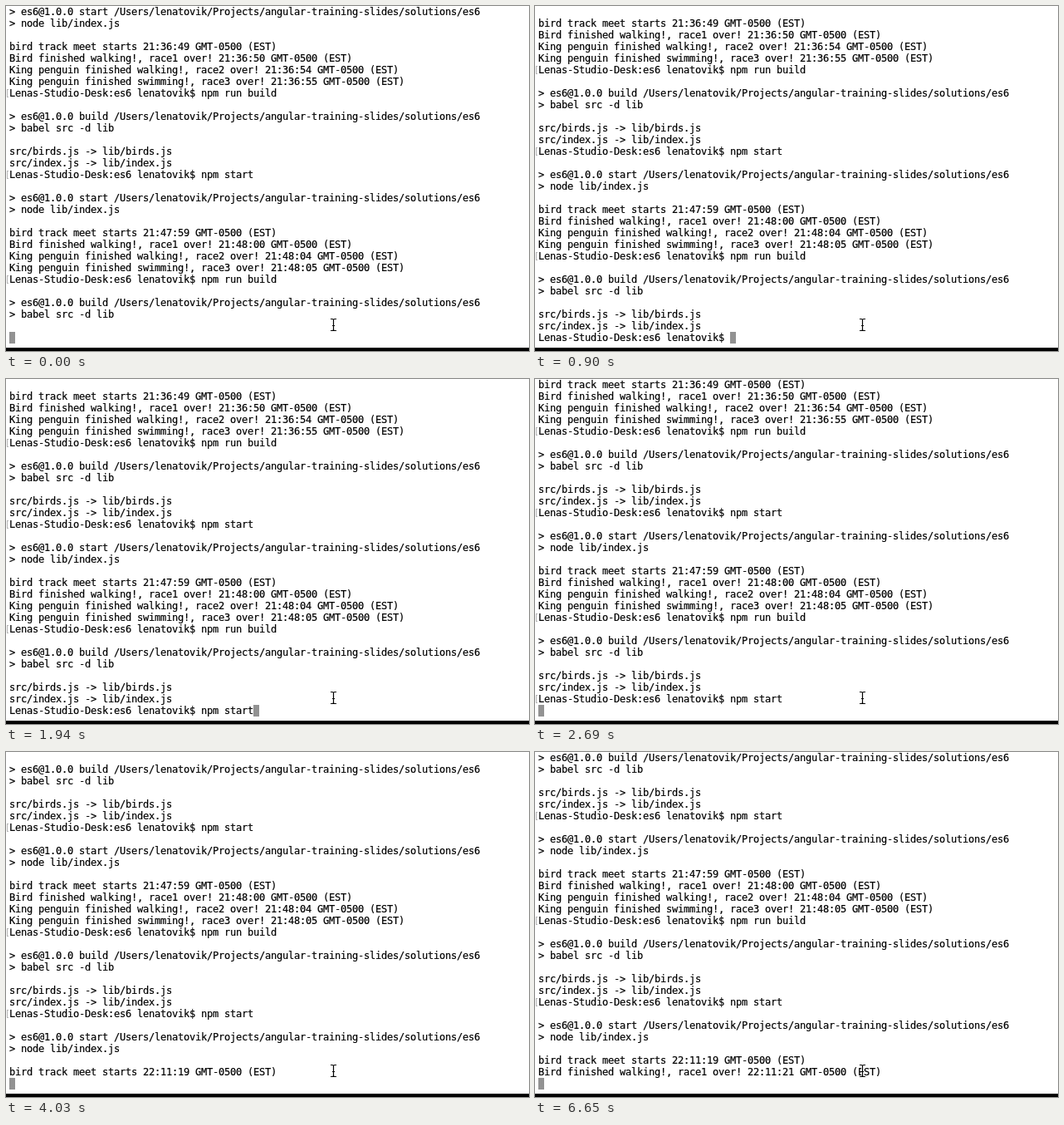
Animation of 630 by 415 pixels, one loop 8000 ms. Source, as an HTML page:

```html
<!DOCTYPE html>
<html lang="en">
<head>
<meta charset="utf-8">
<title>Terminal session</title>
<style>
  html, body { margin: 0; width: 100%; height: 100%; overflow: hidden; background: #fff; }

  .stage {
    position: relative; width: 630px; height: 415px; overflow: hidden;
    background: #fff; border-bottom: 4px solid #000; box-sizing: border-box;
    color: #000;
    font: 12px/14px "DejaVu Sans Mono", monospace;
    letter-spacing: calc(7px - 1ch);
    -webkit-text-stroke: .2px #000;
    white-space: pre;
  }
  .view { position: absolute; inset: 0 0 auto; height: 392px; overflow: hidden; }
  .view pre { margin: 0 0 0 4px; font: inherit; }
  .live { position: absolute; left: 4px; top: 392px; height: 14px; }
  .live span { position: absolute; left: 0; top: 0; }
  .live .command { left: 231px; }
  .caret { width: 7px; height: 14px; background: #929292; }

  /* prompt mark in the left margin */
  b { font-weight: inherit; position: relative; }
  b::before {
    content: ""; position: absolute; left: -3px; top: 2px;
    width: 1px; height: 8px; border: solid #b4b4b4; border-width: 1px 0 1px 1px;
  }
  .pointer { position: absolute; left: 389px; top: 374px; }

  pre, .live span { animation: 8s step-end infinite; }
  pre { animation-name: scroll; }
  .live .prompt { animation-name: prompt; }
  .live .build { animation-name: build; }
  .live .start { animation-name: start; }
  .live .caret { animation-name: caret; }

  @keyframes scroll {
    0% { transform: none; }
    5.625% { transform: translateY(-28px); }
    33.625% { transform: translateY(-42px); }
    39.125% { transform: translateY(-112px); }
    57.875%, 100% { transform: translateY(-126px); }
  }
  @keyframes prompt {
    0%, 33.625%, 100% { visibility: hidden; }
    5.625% { visibility: visible; }
  }
  @keyframes build {
    0%, 24.25%, 100% { visibility: hidden; }
    15% { visibility: visible; }
  }
  @keyframes start {
    0%, 33.625%, 100% { visibility: hidden; }
    24.25% { visibility: visible; }
  }
  @keyframes caret {
    0%, 33.625%, 100% { transform: none; }
    5.625% { transform: translateX(231px); }
    15% { transform: translateX(322px); }
    24.25% { transform: translateX(294px); }
  }
</style>
</head>
<body>
<div class="stage"><div class="view"><pre>&gt; es6@1.0.0 start /Users/lenatovik/Projects/angular-training-slides/solutions/es6
&gt; node lib/index.js

bird track meet starts 21:36:49 GMT-0500 (EST)
Bird finished walking!, race1 over! 21:36:50 GMT-0500 (EST)
King penguin finished walking!, race2 over! 21:36:54 GMT-0500 (EST)
King penguin finished swimming!, race3 over! 21:36:55 GMT-0500 (EST)
<b>Lenas-Studio-Desk:es6 lenatovik$ npm run build</b>

&gt; es6@1.0.0 build /Users/lenatovik/Projects/angular-training-slides/solutions/es6
&gt; babel src -d lib

src/birds.js -&gt; lib/birds.js
src/index.js -&gt; lib/index.js
<b>Lenas-Studio-Desk:es6 lenatovik$ npm start</b>

&gt; es6@1.0.0 start /Users/lenatovik/Projects/angular-training-slides/solutions/es6
&gt; node lib/index.js

bird track meet starts 21:47:59 GMT-0500 (EST)
Bird finished walking!, race1 over! 21:48:00 GMT-0500 (EST)
King penguin finished walking!, race2 over! 21:48:04 GMT-0500 (EST)
King penguin finished swimming!, race3 over! 21:48:05 GMT-0500 (EST)
<b>Lenas-Studio-Desk:es6 lenatovik$ npm run build</b>

&gt; es6@1.0.0 build /Users/lenatovik/Projects/angular-training-slides/solutions/es6
&gt; babel src -d lib

src/birds.js -&gt; lib/birds.js
src/index.js -&gt; lib/index.js
<b>Lenas-Studio-Desk:es6 lenatovik$ npm start</b>

&gt; es6@1.0.0 start /Users/lenatovik/Projects/angular-training-slides/solutions/es6
&gt; node lib/index.js

bird track meet starts 22:11:19 GMT-0500 (EST)
Bird finished walking!, race1 over! 22:11:21 GMT-0500 (EST)</pre></div><div class="live"><span class="prompt">Lenas-Studio-Desk:es6 lenatovik$</span><span class="command build">npm run build</span><span class="command start">npm start</span><span class="caret"></span></div><svg class="pointer" width="12" height="19" fill="none"><path id="beam" d="M2 2.5H4Q5.5 2.5 5.5 4Q5.5 2.5 7 2.5H9M5.5 4V15M4 10.5H7M2 16.5H4Q5.5 16.5 5.5 15Q5.5 16.5 7 16.5H9" stroke="#fff" stroke-width="2.4"/><use href="#beam"/><path d="M2 2.5H4Q5.5 2.5 5.5 4Q5.5 2.5 7 2.5H9M5.5 4V15M4 10.5H7M2 16.5H4Q5.5 16.5 5.5 15Q5.5 16.5 7 16.5H9" stroke="#000" stroke-width="1.2"/></svg></div>
</body>
</html>
```
